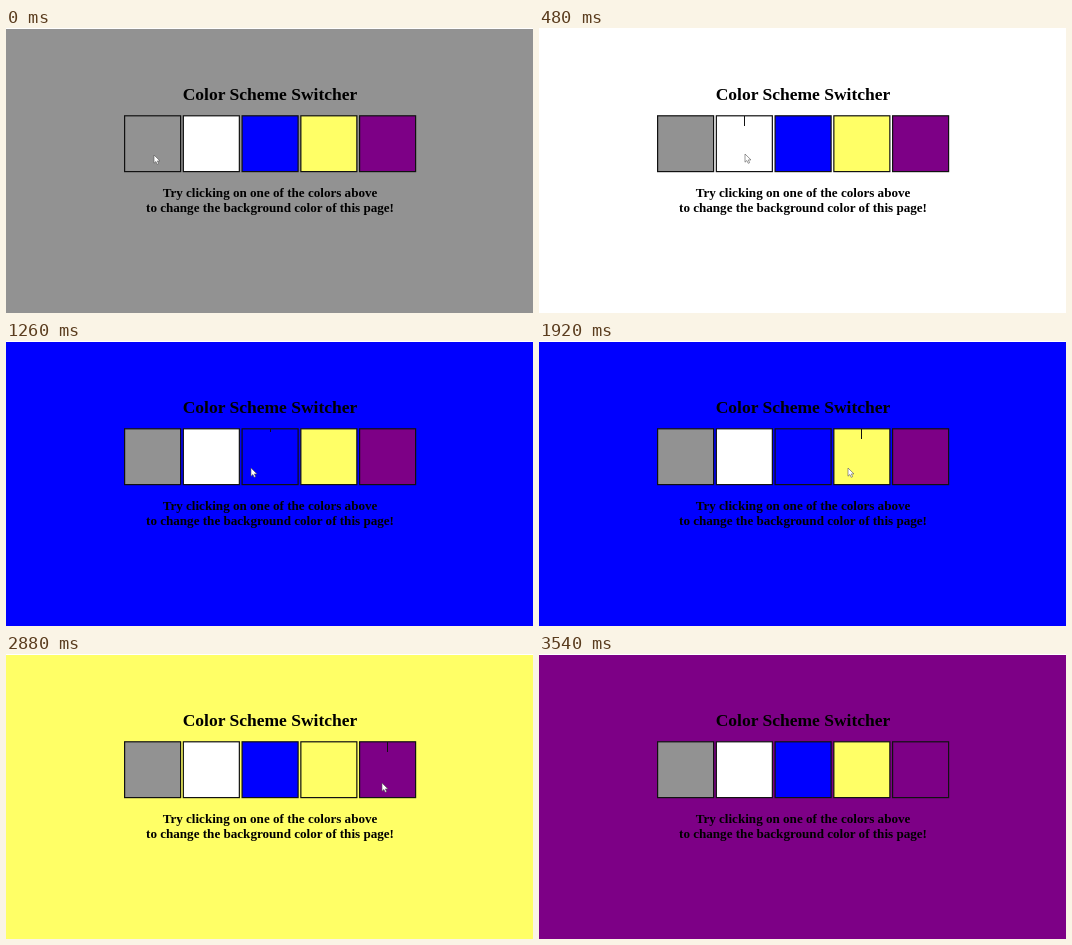
Write an HTML page that moves like this. It is 527 px wide and 285 px high and loops after 3600 ms.

```html
<!DOCTYPE html>
<html lang="en">
<head>
<meta charset="utf-8">
<title>Color Scheme Switcher</title>
<style>
  html, body { margin: 0; width: 100%; height: 100%; overflow: hidden; }
  svg { display: block; width: 527px; height: 285px; }
  text { font: bold 13.1px "Liberation Serif", "Times New Roman", serif; text-anchor: middle; }
  .title { font-size: 17.5px; }
  .box { stroke: #111; stroke-width: 1.2; }
</style>
</head>
<body>
<svg viewBox="0 0 527 285">
  <rect id="page" width="527" height="285"/>
  <rect width="527" height="1" fill="#fff"/>
  <text class="title" x="264" y="72">Color Scheme Switcher</text>
  <g id="boxes"></g>
  <path id="tick" stroke="#111" fill="none"/>
  <text x="264" y="169">Try clicking on one of the colors above</text>
  <text x="264" y="184">to change the background color of this page!</text>
  <path id="cursor" d="M0 0V8.2L1.9 6.5L3.2 9.3L4.6 8.7L3.4 5.9H6Z" fill="#fff" stroke="#555" stroke-width=".6"/>
</svg>
<script>
const LOOP = 3600, STEP = 60, PITCH = 58.75;
const colors = ['#929292', '#ffffff', '#0000ff', '#ffff66', '#7d0086'];
const clicks = [0, 420, 1260, 2040, 2940];
// Cursor stops: time, x, y
const stops = [
  [0, 148, 127], [60, 148, 127], [300, 206, 126], [780, 206, 126],
  [1140, 245, 127], [1320, 245, 127], [1740, 309, 127], [2400, 309, 127],
  [2820, 376, 129], [3060, 376, 129], [3420, 512, 19]
];
const HIDE = 3480;
const $ = id => document.getElementById(id);
const boxX = i => 118.6 + i * PITCH;

$('boxes').innerHTML = colors.map((c, i) =>
  `<rect class="box" x="${boxX(i)}" y="87.8" width="56" height="55.8" fill="${c}"/>`).join('');

function cursorAt(t) {
  const n = stops.findIndex(s => s[0] > t);
  if (n < 0) return stops[stops.length - 1].slice(1);
  const [t0, x0, y0] = stops[n - 1], [t1, x1, y1] = stops[n];
  const p = (t - t0) / (t1 - t0), e = p * p * (3 - 2 * p);
  return [x0 + (x1 - x0) * e, y0 + (y1 - y0) * e];
}

function draw(now) {
  const t = Math.floor(now % LOOP / STEP) * STEP;
  const [x, y] = cursorAt(t);
  const hover = Math.floor((x - boxX(0)) / PITCH);
  const ticked = t < HIDE && y > 88 && y < 144 && hover > 0 && hover < 5;

  $('page').setAttribute('fill', colors[clicks.filter(c => c <= t).length - 1]);
  $('cursor').setAttribute('transform', `translate(${x} ${y})`);
  $('cursor').style.display = t < HIDE ? '' : 'none';
  $('tick').setAttribute('d', ticked ? `M${Math.floor(boxX(hover) + 28) + .5} 88V${hover === 2 ? 91 : 98}` : '');
  requestAnimationFrame(draw);
}
draw(performance.now());
</script>
</body>
</html>
```
